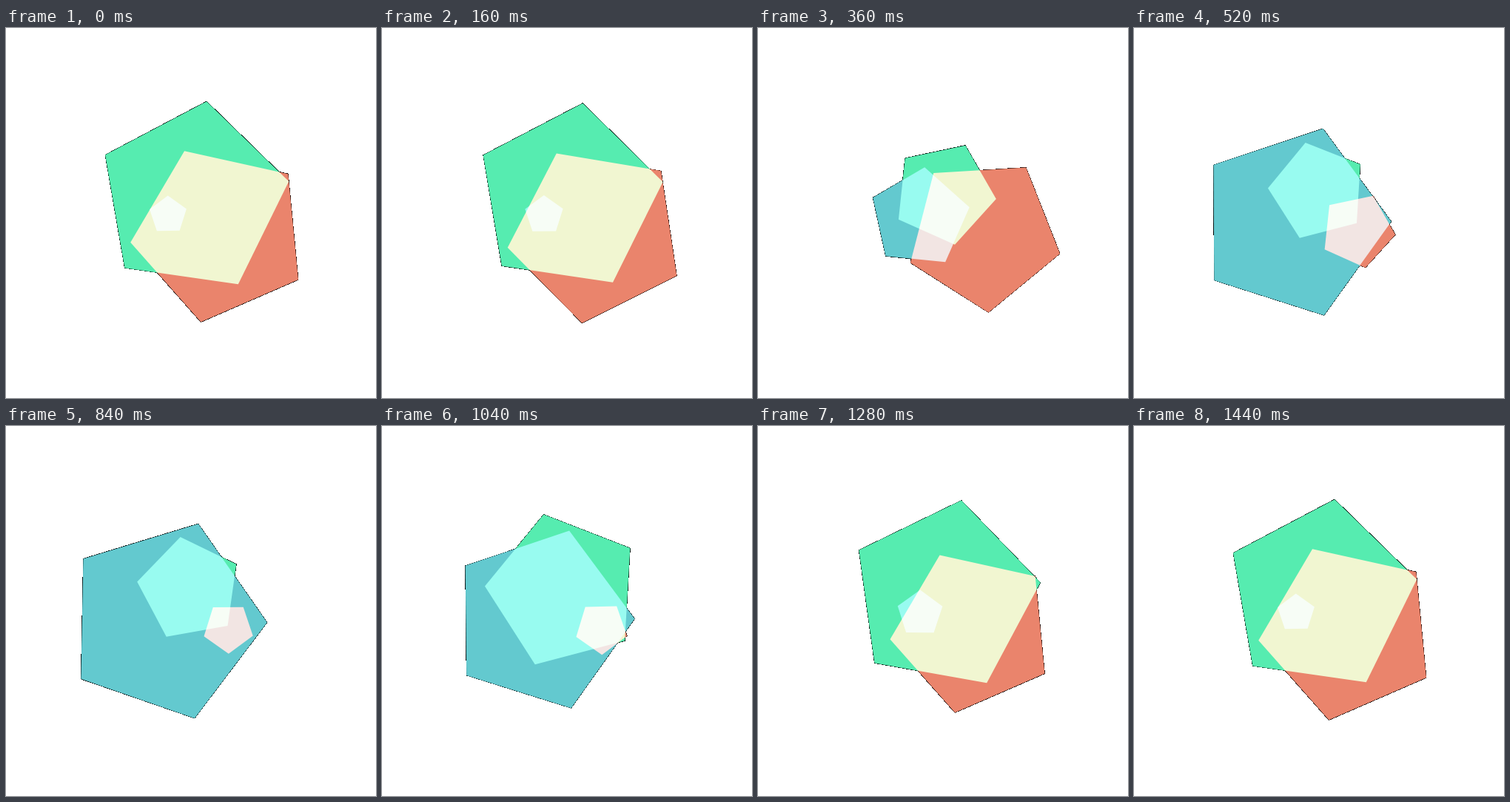
Write an HTML page with a canvas that moves like this. It is 500 px wide and 500 px high and loops after 1.48 s.

```html
<!DOCTYPE html>
<html lang="en">
<head>
<meta charset="utf-8">
<title>Pentagons</title>
<style>
  html, body { margin: 0; width: 100%; height: 100%; overflow: hidden; background: #fff; }
  canvas { display: block; width: 500px; height: 500px; }
</style>
</head>
<body>
<canvas id="stage" width="500" height="500"></canvas>
<script>
const SIZE = 500, STEP = 40, LOOP = 1480;
const ctx = document.getElementById('stage').getContext('2d', { willReadFrequently: true });

// Each property swings from a to b by step `there`, then returns between `back` and `end`.
const shapes = [
  {
    color: '#63c9cf', x: 219, y: 250.3,
    radius: { a: 26.2, b: 138.2, there: 19, back: 19, end: 38 },
    angle: { a: -0.6, b: 19.1, there: 19.7, back: 19.7, end: 37.6 }
  },
  {
    color: '#56ecb0', x: 254.1, y: 217.2,
    radius: { a: 131.8, b: 67.8, there: 13.1, back: 12.8, end: 38 },
    angle: { a: 8.2, b: 62, there: 20, back: 20, end: 37 }
  },
  {
    color: '#ea846c', x: 298.5, y: 270.4,
    radius: { a: 122.1, b: 34.8, there: 22.1, back: 22.1, end: 37.8 },
    angle: { a: 48.5, b: -47.9, there: 13.9, back: 13.1, end: 34.2 }
  }
];

function quintInOut(u) {
  u = Math.min(1, Math.max(0, u));
  return u < 0.5 ? 16 * u ** 5 : 1 - 16 * (1 - u) ** 5;
}

function valueAt({ a, b, there, back, end }, step) {
  const amount = quintInOut(step / there) - quintInOut((step - back) / (end - back));
  return a + (b - a) * amount;
}

// The pivot is the middle of the upright pentagon's bounding box.
function drawPentagon(shape, step) {
  const r = valueAt(shape.radius, step);
  const drop = r * (1 - Math.cos(Math.PI / 5)) / 2;
  ctx.save();
  ctx.translate(shape.x, shape.y);
  ctx.rotate(valueAt(shape.angle, step) * Math.PI / 180);
  ctx.beginPath();
  for (let i = 0; i < 5; i++) {
    const t = i * Math.PI * 2 / 5;
    ctx.lineTo(r * Math.sin(t), drop - r * Math.cos(t));
  }
  ctx.closePath();
  ctx.fillStyle = shape.color;
  ctx.fill();
  ctx.strokeStyle = '#000';
  ctx.lineWidth = 1;
  ctx.stroke();
  ctx.restore();
}

// Outer edges are crisp: every pixel is either opaque or empty.
function hardenEdges() {
  const image = ctx.getImageData(0, 0, SIZE, SIZE);
  const data = image.data;
  for (let i = 3; i < data.length; i += 4) data[i] = data[i] < 128 ? 0 : 255;
  ctx.putImageData(image, 0, 0);
}

let shown = -1;
function render() {
  const step = Math.floor(performance.now() % LOOP / STEP) % 36;
  if (step !== shown) {
    shown = step;
    ctx.clearRect(0, 0, SIZE, SIZE);
    ctx.globalCompositeOperation = 'screen';
    for (const shape of shapes) drawPentagon(shape, step);
    hardenEdges();
  }
  requestAnimationFrame(render);
}
render();
</script>
</body>
</html>
```
